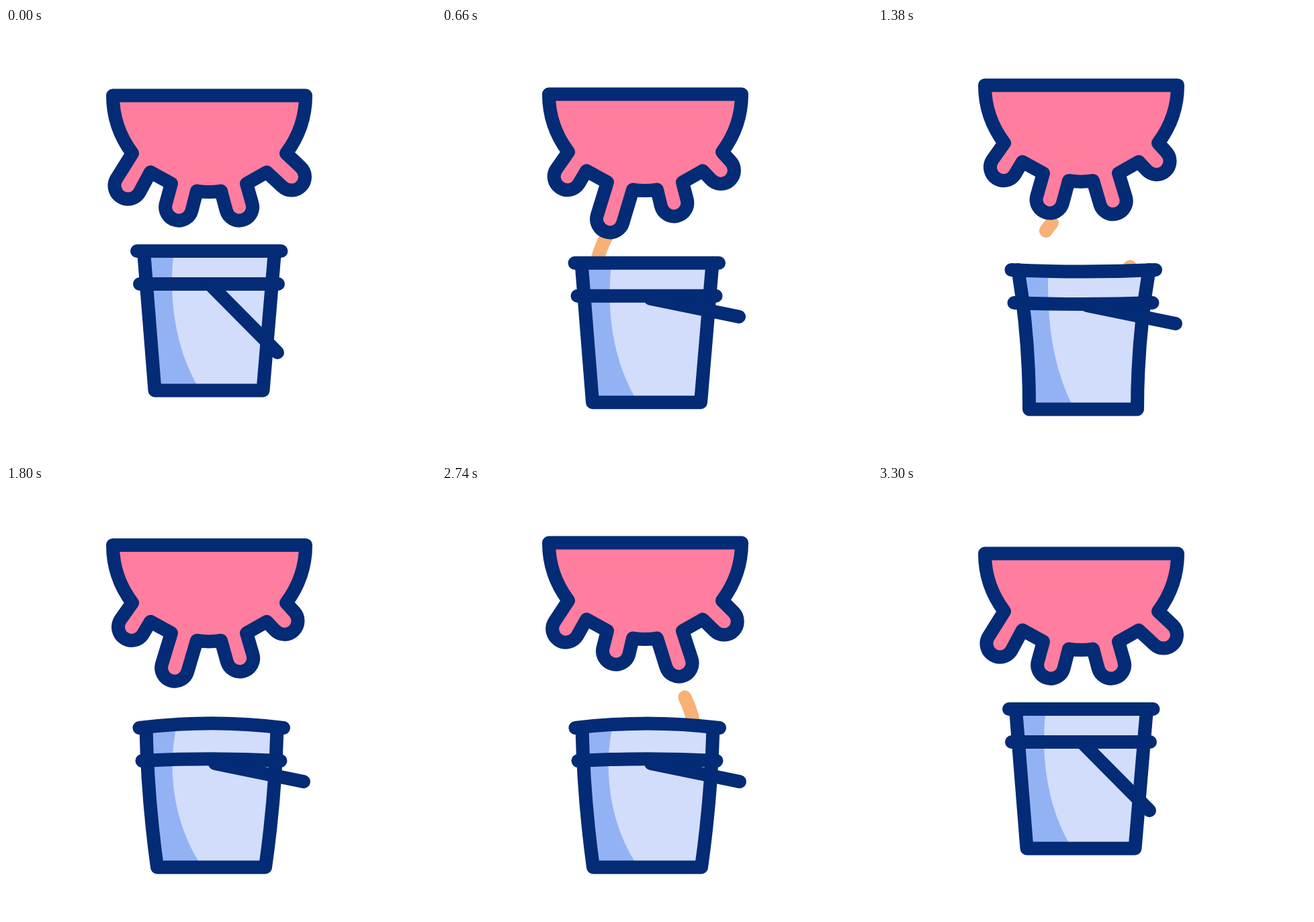
Write an HTML page that moves like this. It is 640 by 640 pixels and loops after 3.48 s.

```html
<!DOCTYPE html>
<html lang="en">
<head>
<meta charset="utf-8">
<title>Milking</title>
<style>
  html, body { margin: 0; width: 100%; height: 100%; overflow: hidden; background: #fff; }
  svg { display: block; width: 100%; height: 100%; }
  .line { fill: none; stroke: #042b75; stroke-width: 20; stroke-linecap: round; stroke-linejoin: round; }
  .jet { fill: none; stroke: #f7b176; stroke-width: 20; stroke-linecap: round; }
  #udder { fill: #ff7e9f; }
</style>
</head>
<body>
<svg viewBox="0 0 640 640">
  <path id="jetL" class="jet" pathLength="100" d="M259 290Q220 335 226 420"/>
  <path id="jetR" class="jet" pathLength="100" d="M345 290Q384 335 378 420"/>
  <circle id="splash" fill="#f7b176"/>
  <g id="bucket">
    <path id="fill" fill="#d2ddfc"/>
    <path id="shade" fill="#93b2f4"/>
    <path id="body" class="line"/>
    <path id="rim" class="line"/>
    <path id="band" class="line"/>
    <path id="handle" class="line"/>
  </g>
  <path id="udder" class="line"/>
</svg>
<script>
const LOOP = 3480;
const set = (id, name, value) => document.getElementById(id).setAttribute(name, value);
const lerp = (a, b, k) => a + (b - a) * k;
const clamp = (x, lo, hi) => Math.min(hi, Math.max(lo, x));

// Sine-eased step from 0 to 1 between two times.
const ramp = (t, a, b) => (1 - Math.cos(Math.PI * clamp((t - a) / (b - a), 0, 1))) / 2;
// Repeating swell from 0 to 1, highest at the peak time.
const wave = (t, peak, period) => (1 + Math.cos(2 * Math.PI * (t - peak) / period)) / 2;

function pose(t) {
  const leave = ramp(t, 2820, 3280);
  const settle = ramp(t, 400, 800);
  const bounce = wave(clamp(t, 320, 2132), 1092, 520);
  return {
    top: 84.6 + 16 * (1 - ramp(t, 160, 460) + ramp(t, 2840, 3300)) +
      19 * bounce * (ramp(t, 420, 620) - ramp(t, 2140, 2500)),
    pullL: lerp(.2, wave(clamp(t, 650, 2195), 650, 1030), ramp(t, 160, 700) - ramp(t, 2740, 3200)),
    pullR: lerp(.2, wave(clamp(t, 605, 2120), 1110, 1010), ramp(t, 420, 605) - ramp(t, 2440, 3190)),
    side: ramp(t, 160, 740) - ramp(t, 2480, 3000),
    drop: 38 * settle - 10 * ramp(t, 160, 400) - 28 * leave,
    shift: 3.5 * (settle - leave),
    swing: ramp(t, 160, 600) - leave,
    bend: (1 - 2 * wave(Math.max(t, 420), 420, 950)) * (ramp(t, 160, 420) - ramp(t, 2800, 3240))
  };
}

// A round-ended teat between two base corners.
function teat(x0, y0, x1, y1, tx, ty) {
  const dx = tx - (x0 + x1) / 2, dy = ty - (y0 + y1) / 2;
  const s = 20 / Math.hypot(dx, dy), px = -dy * s, py = dx * s;
  return `L${x0} ${y0}L${tx + px} ${ty + py}A20 20 0 0 0 ${tx - px} ${ty - py}L${x1} ${y1}`;
}

function drawUdder({ top, pullL, pullR, side }) {
  set('udder', 'd', 'M159 0C159 32 170 62 188 86' +
    teat(188, 86, 215, 114, lerp(181.5, 187, side), lerp(134, 122, side)) +
    teat(246, 131, 284, 142, 259 - 9 * pullL, 161 + 25 * pullL) +
    'Q302 145 320 142' +
    teat(320, 142, 358, 131, 345 + 10.5 * pullR, 161 + 25 * pullR) +
    teat(388, 114, 417, 86, lerp(425, 414.5, side), lerp(121, 113, side)) +
    'C435 62 446 32 446 0Z');
  set('udder', 'transform', `translate(0 ${top})`);
}

function drawBucket({ bend, drop, shift, swing }) {
  const out = bend > 0;
  const rimY = 332 - bend * (out ? 14 : 5);
  const bandY = 381 - bend * (out ? 6 : 4);
  const bulge = bend * (out ? 6 : 9);
  const lean = -5 * bend;
  const body = `M205 332Q${213 - bulge} 436 221.5 539.5L382.5 539.5Q${391.5 + bulge} 436 400 332`;
  set('fill', 'd', `${body}Q302 ${rimY} 205 332Z`);
  set('shade', 'd', `M221.5 539.5Q${213 - bulge} 436 205 332L250 332` +
    `C${243 + lean} 385 ${246 + lean} 470 289 539.5Z`);
  set('body', 'd', body);
  set('rim', 'd', `M195 332Q302 ${rimY} 409.5 332`);
  set('band', 'd', `M199 381Q302 ${bandY} 405 381`);
  set('handle', 'd', `M${lerp(303, 307.5, swing)} ${lerp(381, 385, swing)}` +
    `L${lerp(404, 439.5, swing)} ${lerp(483, 412, swing)}`);
  set('bucket', 'transform', `translate(${shift} ${drop})`);
}

// A dash that runs down the path, its tail following the head.
function drawJet(id, t, starts) {
  const age = t - starts.findLast(s => s < t);
  const head = Math.min(100, age * .35);
  const tail = Math.max(0, (age - 280) * .35);
  const shown = tail < 55 && head > 0;
  set(id, 'visibility', shown ? 'visible' : 'hidden');
  if (!shown) return;
  set(id, 'stroke-dasharray', `${head - tail} 1000`);
  set(id, 'stroke-dashoffset', -tail);
}

function drawSplash(t) {
  const p = clamp((t - 2870) / 330, 0, 1);
  set('splash', 'cx', 390 + 150 * p);
  set('splash', 'cy', 365 - 190 * p + 230 * p * p);
  set('splash', 'r', p > 0 ? 8 * Math.min(1, 4 * (1 - p)) : 0);
}

function draw(t) {
  const now = pose(t);
  drawUdder(now);
  drawBucket(now);
  drawJet('jetL', t, [500, 1350]);
  drawJet('jetR', t, [950, 2400]);
  drawSplash(t);
}

const start = performance.now();
function tick() {
  draw((performance.now() - start) % LOOP);
  requestAnimationFrame(tick);
}
draw(0);
requestAnimationFrame(tick);
</script>
</body>
</html>
```
